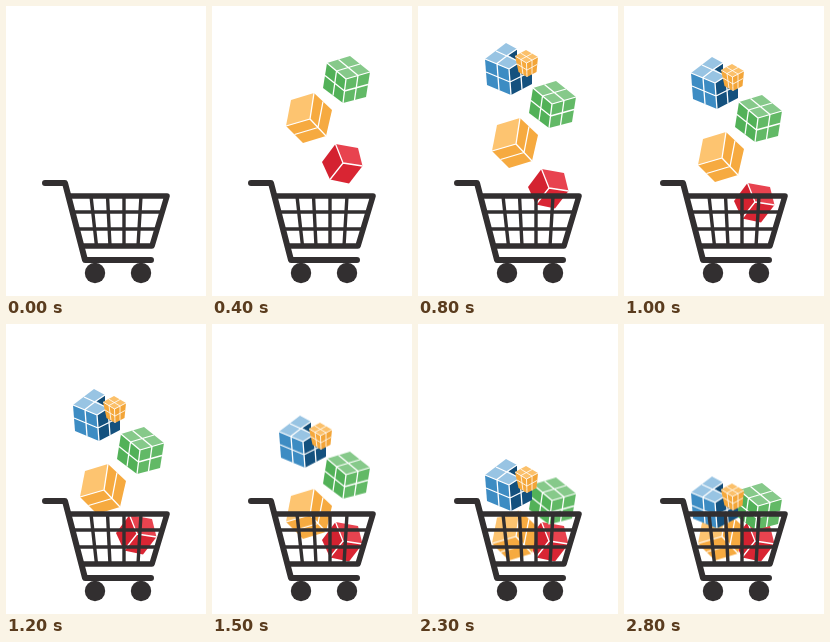
Recreate the animation shown at these times as an HTML page. Size 200 by 290 pixels, loop 2.9 s.

```html
<!DOCTYPE html>
<html lang="en">
<head>
<meta charset="utf-8">
<title>Cubes falling into a cart</title>
<style>
  html, body { margin: 0; width: 100%; height: 100%; overflow: hidden; background: #fff; }
  svg { display: block; width: 200px; height: 290px; }

  .cube { animation: 2.9s infinite both; }
  .cube path { fill: none; stroke: #fff; stroke-width: 1.3; stroke-linejoin: round; }
  .cube .fine { stroke-width: .8; }
  #red { animation-name: red; }
  #orange { animation-name: orange; }
  #green { animation-name: green; }
  #blue { animation-name: blue; }

  /* Everything moves in steps of 100 ms. */
  @keyframes red {
    0% { opacity: 0; transform: translateY(0); animation-timing-function: step-end; }
    6.89% { opacity: 1; transform: translateY(0); animation-timing-function: step-end; }
    17.24% { opacity: 1; transform: translateY(4px); animation-timing-function: steps(8); }
    44.82%, 100% { opacity: 1; transform: translateY(60px); }
  }
  @keyframes orange {
    0% { opacity: 0; transform: translateY(0); animation-timing-function: step-end; }
    10.34% { opacity: 1; transform: translateY(0); animation-timing-function: step-end; }
    17.24% { opacity: 1; transform: translateY(4px); animation-timing-function: steps(7); }
    41.37% { opacity: 1; transform: translateY(53px); animation-timing-function: step-end; }
    44.82% { opacity: 1; transform: translateY(67px); animation-timing-function: steps(6); }
    65.51%, 100% { opacity: 1; transform: translateY(99.5px); }
  }
  @keyframes green {
    0% { opacity: 0; transform: translateY(0); animation-timing-function: step-end; }
    13.79% { opacity: 1; transform: translateY(0); animation-timing-function: step-end; }
    17.24% { opacity: 1; transform: translateY(4px); animation-timing-function: steps(7); }
    41.37% { opacity: 1; transform: translateY(53px); animation-timing-function: step-end; }
    44.82% { opacity: 1; transform: translateY(67px); animation-timing-function: steps(6); }
    65.51% { opacity: 1; transform: translateY(99px); animation-timing-function: steps(9); }
    96.55%, 100% { opacity: 1; transform: translateY(109px); }
  }
  @keyframes blue {
    0% { opacity: 0; transform: translateY(-21px); animation-timing-function: step-end; }
    17.24% { opacity: 1; transform: translateY(-21px); animation-timing-function: steps(7); }
    41.37% { opacity: 1; transform: translateY(28px); animation-timing-function: step-end; }
    44.82% { opacity: 1; transform: translateY(42px); animation-timing-function: steps(6); }
    65.51% { opacity: 1; transform: translateY(80px); animation-timing-function: steps(6); }
    86.2% { opacity: 1; transform: translateY(107px); animation-timing-function: steps(3); }
    96.55%, 100% { opacity: 1; transform: translateY(115.5px); }
  }
</style>
</head>
<body>
<svg viewBox="0 0 200 290">
  <g id="red" class="cube">
    <polygon fill="#e8434f" points="123.5,138 146,142 150.5,160 131,157"/>
    <polygon fill="#d42230" points="123.5,138 131,157 118,173.5 110,156"/>
    <polygon fill="#d92533" points="131,157 150.5,160 137,177.5 118,173.5"/>
    <path d="M123.5 138L131 157L150.5 160M131 157L118 173.5"/>
  </g>

  <g id="orange" class="cube">
    <polygon fill="#fdc470" points="79,94 102,87 98,113 74,120"/>
    <polygon fill="#f6aa40" points="102,87 120,104 114,130 98,113"/>
    <polygon fill="#f6aa40" points="74,120 98,113 114,130 91,137"/>
    <path d="M102 87L98 113L74 120M98 113L114 130M111 95.5L106 121.5L82.5 128.5"/>
  </g>

  <g id="green" class="cube">
    <polygon fill="#86c98a" points="138,50 158,66 134,73 115,57"/>
    <polygon fill="#52b158" points="115,57 134,73 131,97 111,82"/>
    <polygon fill="#62b966" points="134,73 158,66 154,91 131,97"/>
    <path d="M115 57L134 73L158 66M134 73L131 97M148 58L124.5 65L121 89.5M126.5 53.5L146 69.5L142.5 94M113 69.5L132.5 85L156 78.5"/>
  </g>

  <g id="blue" class="cube">
    <polygon fill="#134c76" points="99,43 99,53 104,56 102,57 90,49"/>
    <polygon fill="#98c4e3" points="88,37 99,43 90,49 102,56 91,63 67,53"/>
    <polygon fill="#3d8cc3" points="67,53 91,63 93,89 69,79"/>
    <polygon fill="#14517e" points="91,63 102,56 103,66 114,65 114,78 93,89"/>
    <path d="M99 43L90 49L79 57.5L81 84M78 45L102 56L104 83.5M68 66L92 76L114 65M67 53L91 63L102 56M91 63L93 89"/>
    <polygon fill="#fbc06a" points="108,44 120,51 108.5,57 97,50"/>
    <polygon fill="#f6a93c" points="97,50 108.5,57 109,71 100.5,66"/>
    <polygon fill="#f3a538" points="108.5,57 120,51 118.5,66 109,71"/>
    <path class="fine" d="M97 50L108.5 57L120 51M108.5 57L109 71M114 47.5L103 53.5L105 68.5M102.5 47L114 54L114 68.5M99 58L109 64L119 58.5"/>
  </g>

  <g fill="none" stroke="#322f30" stroke-linecap="round" stroke-linejoin="round">
    <path stroke-width="6" d="M39 177H59L79 254H145"/>
    <path stroke-width="5.6" d="M63 190H161L146 240H76"/>
    <path stroke-width="3.4" d="M67 206H156M72 223H151M85 190L90.5 240M101.5 190L104 240M118 190V240M135 190L132 240"/>
  </g>
  <g fill="#322f30">
    <circle cx="89" cy="267" r="10.2"/>
    <circle cx="135" cy="267" r="10.2"/>
  </g>
</svg>
</body>
</html>
```
